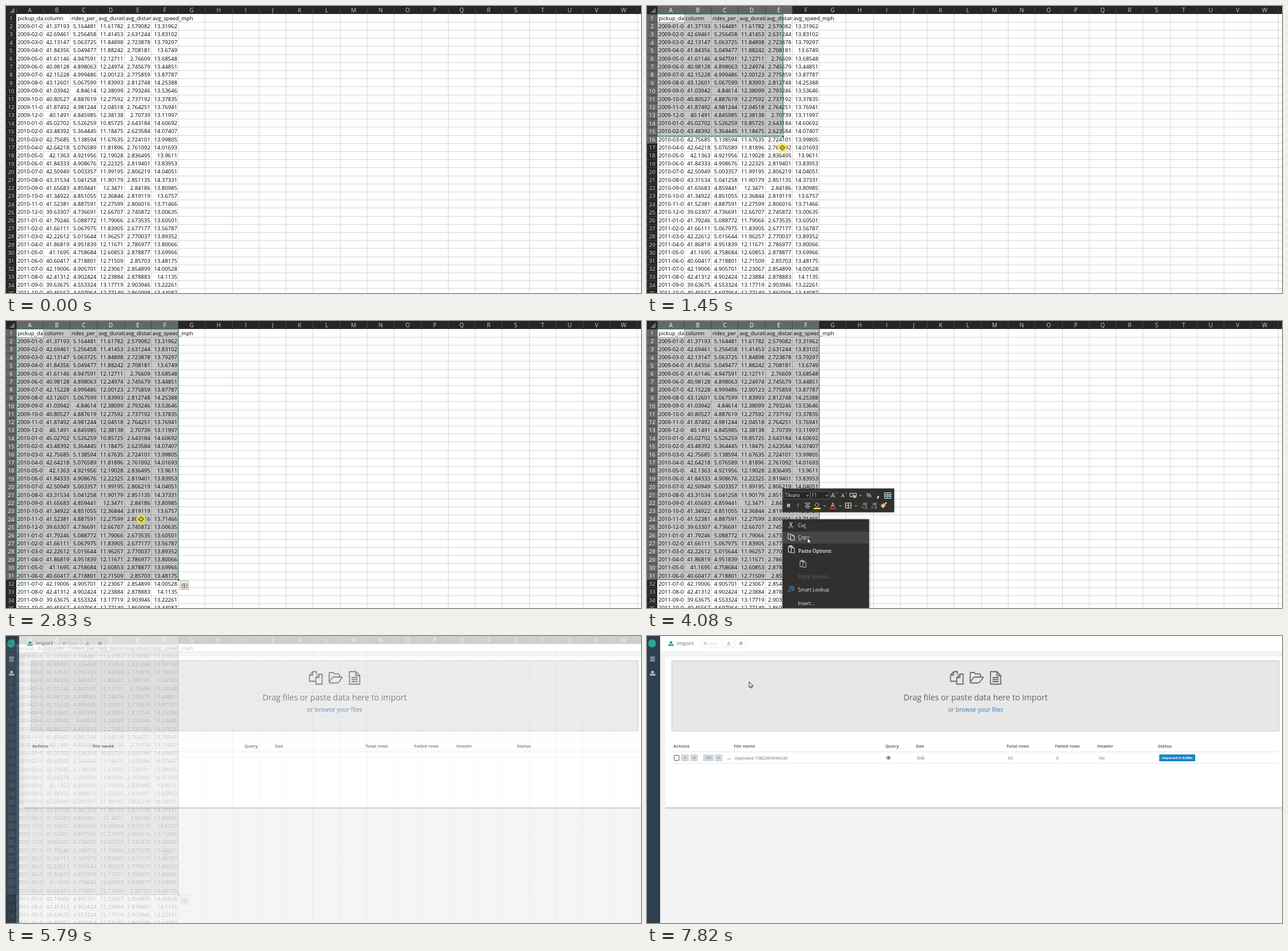
These frames come from a looping animation (1112 by 504 pixels, 8000 ms). An HTML page with a canvas:

```html
<!DOCTYPE html>
<html lang="en">
<head>
<meta charset="utf-8">
<title>Paste to import</title>
<style>
  html, body { margin: 0; width: 100%; height: 100%; overflow: hidden; background: #fff; }
  canvas { position: absolute; left: 0; top: 0; width: 100%; height: 100%; }
</style>
</head>
<body>
<canvas id="sheet"></canvas>
<canvas id="page"></canvas>
<script>
const W = 1112, H = 504, LOOP = 8000;
const LEFT = 18, TOP = 14, COL = 47.27, ROW = 14.2;
const GREEN = '#217346', INK = '#676a6c';

// Per month: value, rides per hour, distance. Duration and speed follow from these.
const months = `41.37193 5.164481 2.579082
42.69461 5.256458 2.631244
42.13147 5.063725 2.723878
41.84356 5.049477 2.708181
41.61146 4.947591 2.76609
40.98128 4.898063 2.745679
42.15228 4.999486 2.775859
43.12601 5.067599 2.812748
41.03942 4.84614 2.793246
40.80527 4.887619 2.737192
41.87492 4.981244 2.764251
40.1491 4.845985 2.70739
45.02702 5.526259 2.643184
43.48392 5.364445 2.623584
42.75685 5.138594 2.724101
42.64218 5.076589 2.761092
42.1363 4.921956 2.836495
41.84333 4.9086763 2.819401
42.50949 5.003357 2.8062188
43.31534 5.041258 2.851135
41.65683 4.859441 2.84186
41.34922 4.851055 2.819119
41.52381 4.887591 2.806016
39.63307 4.736691 2.745872
41.79246 5.088772 2.673535
41.66111 5.067975 2.677177
42.22612 5.015644 2.770037
41.86819 4.951839 2.786977
41.1695 4.758684 2.8788767
40.60417 4.718801 2.8570297
42.19006 4.905701 2.854899
42.41312 4.902424 2.8788829
39.63675 4.553324 2.903946
40.45567 4.697964 2.860998`.split('\n').map((line, i) => {
  const [value, rides, distance] = line.split(' ').map(Number);
  const month = String(i % 12 + 1).padStart(2, '0');
  const round = (n, digits) => String(+n.toFixed(digits));
  return [`${2009 + Math.floor(i / 12)}-${month}-0`, round(value, 5), round(rides, 6),
    round(60 / rides, 5), round(distance, 6), round(distance * rides, 5)];
});
const titles = ['pickup_da', 'column', 'rides_per_', 'avg_durati', 'avg_distan', 'avg_speed_mph'];

const sheet = document.getElementById('sheet'), page = document.getElementById('page');
const scale = window.devicePixelRatio || 1;
let g;
for (const canvas of [sheet, page]) {
  canvas.width = W * scale;
  canvas.height = H * scale;
  canvas.getContext('2d').scale(scale, scale);
}

// Staircase from 0 to 1 in n equal jumps, the first at start and the last at end.
function ramp(t, start, end, n) {
  if (t < start) return 0;
  if (t >= end) return 1;
  return (Math.floor((t - start) / (end - start) * (n - 1)) + 1) / n;
}

// Position on a polyline of [parameter, x, y] points.
function along(points, u) {
  let i = 1;
  while (i < points.length - 1 && u > points[i][0]) i++;
  const [a, ax, ay] = points[i - 1], [b, bx, by] = points[i];
  const p = Math.min(1, Math.max(0, (u - a) / (b - a)));
  return [ax + (bx - ax) * p, ay + (by - ay) * p];
}

const rect = (x, y, w, h, color) => { g.fillStyle = color; g.fillRect(x, y, w, h); };

function box(x, y, w, h, fill, border, radius = 0) {
  g.beginPath();
  g.roundRect(x, y, w, h, radius);
  if (fill) { g.fillStyle = fill; g.fill(); }
  if (border) { g.strokeStyle = border; g.lineWidth = 1; g.stroke(); }
}

// Text centred on its capital height at y.
function text(s, x, y, size, color, align = 'left', weight = 400) {
  g.font = `${weight} ${size}px "Open Sans", "Noto Sans", sans-serif`;
  g.textAlign = align;
  g.fillStyle = color;
  g.fillText(s, x, y + size * .357);
}

function stroke(d, color, width = 1, x = 0, y = 0) {
  g.save();
  g.translate(x, y);
  g.strokeStyle = color;
  g.lineWidth = width;
  g.stroke(new Path2D(d));
  g.restore();
}

function shape(d, x, y, fill, outline) {
  g.save();
  g.translate(x, y);
  const path = new Path2D(d);
  g.fillStyle = fill;
  g.fill(path);
  if (outline) { g.strokeStyle = outline; g.lineWidth = .9; g.stroke(path); }
  g.restore();
}

const arrow = (x, y) =>
  shape('M0 0v10l2.3-2.2 1.6 3.3 1.5-.7-1.6-3.2h3.2z', x, y, '#fff', '#111');
const cross = (x, y) =>
  shape('M-1-4h2v3h3v2h-3v3h-2v-3h-3v-2h3z', x, y, '#fff', '#222');

function clickSpot(x, y, alpha = 1) {
  g.globalAlpha = alpha;
  g.beginPath();
  g.arc(x, y, 8.5, 0, 7);
  g.fillStyle = 'rgba(243,234,30,.7)';
  g.fill();
  g.globalAlpha = 1;
}

const upload = (x, y, color) =>
  shape('M0-4.5l3.6 3.6h-2.2v2.6h-2.8v-2.6h-2.2zM-4.7 1.3h2.5v1.3h4.4v-1.3h2.5v3.2h-9.4z', x, y, color);

function drawHeaders(cols, rows) {
  rect(0, 0, W, TOP, '#262626');
  rect(0, 0, LEFT, H, '#262626');
  rect(LEFT, 0, cols * COL, TOP, '#666');
  rect(0, TOP, LEFT, rows * ROW, '#666');
  for (let c = 0; c < 24; c++) {
    rect(Math.floor(LEFT + c * COL), 1, 1, TOP - 2, '#474747');
    text(String.fromCharCode(65 + c), LEFT + (c + .5) * COL, 7.2, 10, c < cols ? '#fff' : '#d0d0d0', 'center');
  }
  for (let r = 0; r < 35; r++) {
    rect(0, Math.floor(TOP + r * ROW), LEFT - 1, 1, '#404040');
    text(r + 1, 9, TOP + r * ROW + 7.5, 9.6, r < rows ? '#fff' : '#d0d0d0', 'center');
  }
  shape('M15 3v9H6z', 0, 0, '#747474');
}

function drawCells() {
  const size = 9.5, weight = 500;
  months.forEach((cells, i) => cells.forEach((value, c) => {
    const y = TOP + (i + 1) * ROW + 7.3;
    if (c) text(value, LEFT + (c + 1) * COL - 1.7, y, size, '#000', 'right', weight);
    else text(value, 20, y, size, '#000', 'left', weight);
  }));
  titles.forEach((title, c) => {
    g.save();
    g.beginPath();
    g.rect(LEFT + c * COL, TOP, c < 5 ? COL : 2 * COL, ROW);
    g.clip();
    text(title, LEFT + c * COL + 2.2, TOP + 7.3, size, '#000', 'left', weight);
    g.restore();
  });
}

function drawSelection(right, bottom) {
  g.fillStyle = 'rgba(0,0,0,.225)';
  g.beginPath();
  g.rect(LEFT, TOP, right - LEFT, bottom - TOP);
  g.rect(LEFT, TOP, COL, ROW);
  g.fill('evenodd');
}

function drawSelectionFrame(right, bottom) {
  g.strokeStyle = GREEN;
  g.lineWidth = 1.2;
  g.strokeRect(LEFT, TOP, right - LEFT, bottom - TOP);
  rect(right - 2.5, bottom - 2.5, 5, 5, '#fff');
  rect(right - 1.7, bottom - 1.7, 3.6, 3.6, GREEN);
}

function drawQuickButton() {
  box(304.5, 456.5, 15, 15, '#f1f1f1', '#ababab');
  stroke('M308 461.5h9v7h-9zM308 465h9M312.5 461.5v7', '#555', .9);
  shape('M3 0L-1 5h2L-1 9l5-5H2z', 308, 459, '#e8a33d');
}

function drawToolbar() {
  const light = '#e6e6e6', y1 = 306, y2 = 324;
  const caret = (x, y) => stroke('M-1.8-1L0 1l1.8-2', light, 1, x, y);
  box(237.5, 294.5, 195, 41, '#31302f', '#4b4b4b');
  box(239.5, 299.5, 46, 13, '#262626', '#555');
  box(286.5, 299.5, 33, 13, '#262626', '#555');
  text('Tilvaro', 241.5, y1, 8.4, light);
  text('11', 288, y1, 8.4, light);
  for (const x of [281, 315, 374]) caret(x, y1 + .5);
  for (const x of [311, 338.5, 366]) caret(x, y2 + .5);
  text('A', 322, y1, 11, light);
  text('A', 340, y1 + .5, 9.5, light);
  stroke('M330 303l1.8-2 1.8 2M347 301l1.5 1.8 1.5-1.8', '#5fb0e8');
  stroke('M355.5 302.5h11v6h-11zM359 305.5h4', light);
  box(361, 306, 5, 5, '#d8b56a', null, 2);
  text('%', 388.5, y1, 11.5, light, 'center');
  text(',', 405, y1 - 4, 19, light, 'center', 700);
  stroke('M416 301.5h11v10h-11zM416 304.5h11M416 308.5h11M421.5 301v3M421.5 309v3', light);
  rect(416.5, 304.5, 10, 4, '#3f9ad8');
  text('B', 248, y2, 9.5, light, 'center', 700);
  g.save();
  g.transform(1, 0, -.2, 1, y2 * .2, 0);
  text('I', 264.5, y2, 9.5, light, 'center');
  g.restore();
  stroke('M276 320h10M278 322.7h6M276 325.4h10M278 328h6', light);
  shape('M0 3L4-1l4 4-4 4z', 293.5, 320, '#31302f', light);
  rect(292, 328, 12, 2.4, '#f5e51b');
  text('A', 325.5, y2 - 1, 10, light, 'center');
  rect(320, 328, 11, 2.4, '#e02b20');
  stroke('M347.5 319.5h10v9h-10zM352.5 319.5v9M347.5 324h10', light);
  for (const x of [381, 398]) {
    text('.00', x, y2 - 2.5, 6.5, light, 'center');
    text('.0', x + 2, y2 + 3.5, 6.5, light, 'center');
    stroke('M-5 3.5h4M-5 3.5l1.5-1.5M-5 3.5l1.5 1.5', '#4aa3e0', 1, x, y2);
  }
  shape('M409 324l5-4 4 4-5 5z', 0, 0, '#e8bd6a');
  stroke('M416 322l3.5-3.5', light, 2);
}

const clipboard = (x, y, color) => {
  stroke('M-1 5h-4v-10h8v2M-3-6.5h4v2.5h-4z', color, 1, x, y);
  stroke('M0-2.5h5.5v8.5h-5.5z', color, 1, x, y);
};

function drawMenu(hover) {
  const light = '#f0f0f0', size = 8.4, x = 264.5;
  g.shadowColor = 'rgba(0,0,0,.35)';
  g.shadowBlur = 4;
  box(237.5, 348.5, 151, 170, '#31302f', '#4b4b4b');
  box(237.5, 294.5, 195, 41, '#31302f');
  g.shadowBlur = 0;
  drawToolbar();
  if (hover) rect(238, hover === 1 ? 349 : 370, 150, 21, '#484644');
  text('Cut', x, 359, size, light);
  text('Copy', x, 380.5, size, light);
  rect(275, 363, 3, .8, light);
  rect(265, 384.5, 5, .8, light);
  text('Paste Options:', 265, 403.5, 8.5, light, 'left', 600);
  text('Paste Special...', x, 449.5, size, '#666');
  text('Smart Lookup', x, 472.5, size, light);
  text('Insert...', x, 496, size, light);
  stroke('M249.5 353l4.5 8M254.5 353l-4.5 8', light);
  stroke('M248 362a1.5 1.5 0 1 0 3 0a1.5 1.5 0 1 0-3 0M253 362a1.5 1.5 0 1 0 3 0a1.5 1.5 0 1 0-3 0', '#4aa3e0');
  stroke('M252 383h-5v-9h5M251.5 375.5h4l2.5 2.5v7h-6.5zM255.5 375.5v2.5h2.5', light);
  clipboard(252.5, 401, light);
  clipboard(273, 426.5, '#bdbdbd');
  stroke('M250 471a3.7 3.7 0 1 1 3 2.5M250.5 472.5l-3.5 4M253.5 468.5v3.5', '#4aa3e0', 1.2);
}

const A1 = [LEFT + COL, TOP + ROW], LAST = LEFT + 6 * COL;
const pointerPath = [[0, 37, 23], [8 / 11, 237, 249], [1, 283, 397], [2, 283, 449], [3, 236.5, 348], [4, 281, 381]];
const cornerPath = [[0, ...A1], [8 / 11, 238, 229], [1, LAST, 377], [2, LAST, TOP + 31 * ROW]];

function drawSheet(t) {
  const stage = ramp(t, 910, 1680, 11) + ramp(t, 1760, 2000, 4) +
    ramp(t, 2140, 2450, 5) + ramp(t, 3320, 4080, 11);
  const [x, y] = along(pointerPath, stage);
  const corner = along(cornerPath, stage);
  const active = t >= 70;
  // Headers light up for every column and row the selection touches.
  const touched = (edge, start, size) => active ? Math.ceil((edge - start) / size - .01) : 0;

  rect(0, 0, W, H, '#fff');
  for (let c = 1; c < 24; c++) rect(Math.floor(LEFT + c * COL), TOP, 1, H, '#d6d6d6');
  for (let r = 1; r < 35; r++) rect(LEFT, Math.floor(TOP + r * ROW), W, 1, '#d6d6d6');
  rect(Math.floor(LAST), TOP, 1, ROW - 1, '#fff');
  if (active) drawSelection(...corner);
  drawCells();
  drawHeaders(touched(corner[0], LEFT, COL), touched(corner[1], TOP, ROW));
  if (active) {
    g.globalAlpha = ramp(t, 70, 220, 3);
    drawSelectionFrame(...corner);
    g.globalAlpha = 1;
  }
  if (t >= 2140) drawQuickButton();

  const menu = t >= 2920 && t < 5180;
  if (menu) {
    g.globalAlpha = ramp(t, 2920, 3020, 2);
    drawMenu(stage <= 3 ? 0 : y < 370 ? 1 : 2);
    g.globalAlpha = 1;
  }
  if (t >= 450 && t < 2140) clickSpot(x, y, ramp(t, 450, 530, 2));
  if (t >= 2830 && t < 2920) clickSpot(x, y);
  if (t >= 5030 && t < 5180) clickSpot(x, y - 1);
  if (menu) arrow(x, y);
  else if (t >= 450) cross(t < 760 ? x + 1 : x, y);
}

function drawRow() {
  const y = 214, chip = '#d1dade';
  box(47.5, 209.5, 8.5, 9, '#fff', '#555', 1);
  for (const [label, x, w] of [['A', 60, 13], ['O', 76, 13], ['LEV', 98, 19], ['H', 119, 13]]) {
    box(x, 208, w, 12, chip, null, 1.5);
    text(label, x + w / 2, y + .3, 5.8, '#5e5e5e', 'center');
  }
  for (const x of [141, 143.3, 145.6]) rect(x, 215, 1.3, 1.3, '#3a87c0');
  for (const [s, x] of [['clipboard-1582569494430', 153], ['3KB', 472], ['30', 631.5], ['0', 716.5], ['No', 791.5]])
    text(s, x, y, 7.7, INK);
  stroke('M418.8 214q4-5 8 0q-4 5-8 0z', '#555');
  box(421.2, 212, 3.2, 3.6, '#555', null, 1.6);
  box(897, 208, 63, 12, '#1c84c6', null, 1.5);
  text('imported in 0.089s', 928.5, y + .2, 5.8, '#fff', 'center', 700);
  rect(44, 223, 1063, 1, '#e7e7e7');
}

function drawPage(t) {
  rect(0, 0, W, H, '#f3f3f3');
  rect(23, 0, W, 27.5, '#fff');
  rect(23, 27.5, W, 1, '#e9ebec');
  rect(0, 0, 23, H, '#2f4050');
  box(2, 6, 14, 14, '#2aa79b', null, 7);
  for (const y of [36.5, 39.7, 42.9]) rect(5.5, y, 8.5, 1.5, '#c3ccd4');
  upload(9.8, 65, '#c3ccd4');

  upload(42, 13, '#1f9d8f');
  text('import', 52, 13, 9.5, INK);
  for (const [x, w] of [[93.5, 37], [133.5, 19], [155.5, 18]]) box(x, 5.5, w, 15, '#fff', '#eee', 1.5);
  stroke('M99.5 10.7l4.5 4.5M104 10.7l-4.5 4.5', '#c9c9c9', 1.7);
  text('Clear', 107, 13, 7.7, '#cfcfcf');
  g.save();
  g.translate(143, 13);
  g.scale(.72, .72);
  upload(0, 0, '#c4c4c4');
  g.restore();
  rect(161.5, 10, 6, 6, '#c4c4c4');

  rect(32, 35, W, 266, '#fff');
  rect(32, 34.5, W, 1, '#e7eaec');
  rect(32, 300.5, W, 3, '#d2d2d2');
  box(43.5, 43.5, 1063.5, 123.5, '#e7e7e7', '#c6c6c6', 1);
  g.lineJoin = 'round';
  stroke('M542 79.5h-10.5v-11l5.5-6h6.5v5M531.5 68.5h5.5v-6M542.5 73l5.5-6h5.5v17.5h-11zM542.5 73h5.5v-6', INK, 1.8);
  stroke('M566 80V66q0-2 2-2h5l2 2.7h7q2 0 2 2v3M566 80.5l5.5-7q1.2-1.5 3-1.5h12.5q2.5 0 1 2l-5 6.5q-1.5 2-3.5 2h-11.5q-2 0-2-2z', INK, 1.8);
  stroke('M601.5 62.5h11l7 7v15h-18zM612.5 62.5v7h7M605 73h11M605 76.5h11M605 80h11', INK, 1.8);
  g.lineJoin = 'miter';
  text('Drag files or paste data here to import', 575.5, 108, 14.2, '#5f6264', 'center');
  text('or', 527, 129, 10.5, INK);
  text('browse your files', 540.5, 129, 10.5, '#337ab7');

  for (const [s, x] of [['Actions', 46], ['File name', 152], ['Query', 417.5], ['Size', 470.5],
    ['Total rows', 629.5], ['Failed rows', 714.5], ['Header', 788.5], ['Status', 894.5]])
    text(s, x, 193.7, 7.7, INK, 'left', 700);
  rect(44, 203, 1063, 1, '#e4e4e4');

  g.globalAlpha = ramp(t, 7670, 7820, 3);
  if (g.globalAlpha) drawRow();
  g.globalAlpha = 1;

  if (t >= 6570) {
    const x = t < 6720 ? 190 : 179;
    if (t < 6890) clickSpot(x, 80);
    arrow(x, 80.5);
  }
}

function render() {
  const t = performance.now() % LOOP;
  const fade = ramp(t, 5270, 5870, 9);
  page.style.opacity = fade;
  if (fade < 1) { g = sheet.getContext('2d'); drawSheet(t); }
  if (fade > 0) { g = page.getContext('2d'); drawPage(t); }
  requestAnimationFrame(render);
}
render();
</script>
</body>
</html>
```
